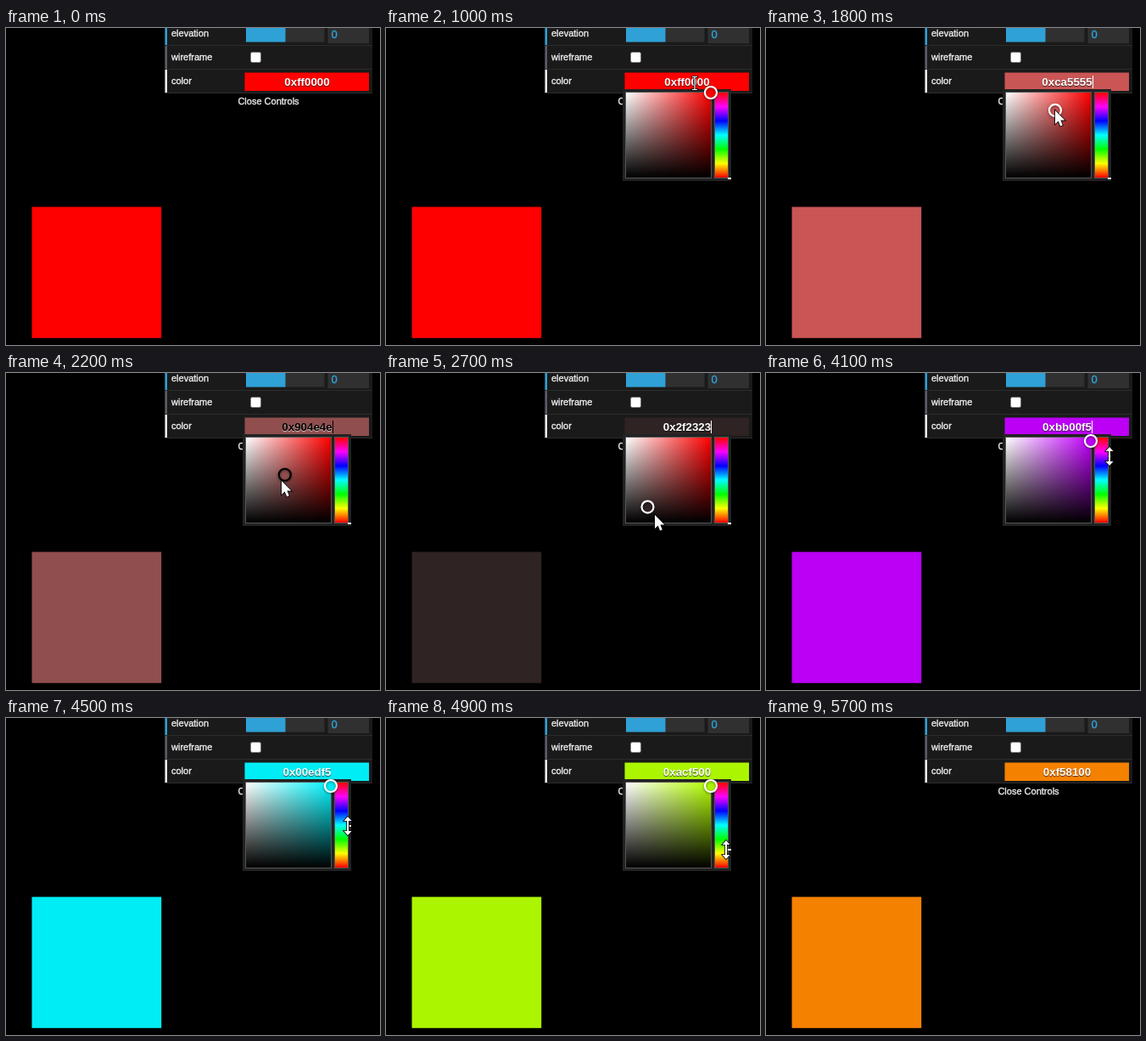
These frames come from a looping animation (441 by 373 pixels, 6.1 s). An HTML page with a canvas:

```html
<!DOCTYPE html>
<html lang="en">
<head>
<meta charset="utf-8">
<title>Color controls</title>
<style>
  html, body { margin: 0; width: 100%; height: 100%; overflow: hidden; background: #000; }
  canvas { display: block; }
</style>
</head>
<body>
<canvas id="stage" width="441" height="373"></canvas>
<script>
const ctx = document.getElementById('stage').getContext('2d');
const LOOP = 6100, STEP = 100;
const FONT = '"Liberation Sans", Arial, sans-serif';
const BLUE = '#2fa1d6';
const FIELD = { x: 283, y: 76, size: 100 };
const BAR_X = 388, BAR_W = 15;

// Phases of the interaction, in ms.
const ENTER = 400, OPEN = 500, FOCUS = 1200, DRAG = 1500, HUE = 3800, LEAVE = 5300, CLOSE = 5500, GONE = 5700;

const clamp = (v, lo, hi) => Math.max(lo, Math.min(hi, v));
const mix = (a, b, p) => a.map((v, i) => v + (b[i] - v) * p);
const glide = (from, to, start, end, t) => mix(from, to, clamp((t - start) / (end - start), 0, 1));

// Stops of the drag through the field: [time, saturation, value].
const dragStops = [
  [DRAG, 1, 1], [1800, .579, .792], [1900, .58, .79], [2700, .255, .184],
  [2800, .34, .09], [3400, .855, .702], [3700, 1, .96]
];

function saturationValue(t) {
  const next = dragStops.findIndex(stop => stop[0] > t);
  if (next === 0) return [1, 1];
  if (next < 0) return dragStops.at(-1).slice(1);
  const [start, ...from] = dragStops[next - 1];
  const [end, ...to] = dragStops[next];
  return glide(from, to, start, end, t);
}

const hueAt = t => t < HUE ? 0 : clamp(285.8 - (t - 4100) * .26, 31.6, 360);
const hueY = hue => FIELD.y + FIELD.size * (1 - hue / 360);

function knobAt(t) {
  const [s, v] = saturationValue(t);
  return [FIELD.x + FIELD.size * s, FIELD.y + FIELD.size * (1 - v)];
}

function pointerAt(t) {
  const rest = [364, 65];
  if (t < DRAG) return glide([426, 72], rest, ENTER, 1000, t);
  if (t < DRAG + STEP) return mix(rest, knobAt(1800), .4);
  // The knob trails the pointer by one step.
  if (t < HUE) return knobAt(t + STEP);
  const onBar = [405 - (t - 4100) / 200, hueY(hueAt(t)) + 1];
  return glide(onBar, [411, 365], LEAVE, LEAVE + 3 * STEP, t);
}

function hsvToRgb(h, s, v) {
  return [5, 3, 1].map(n => {
    const k = (n + h / 60) % 6;
    return Math.round(255 * v * (1 - s * clamp(Math.min(k, 4 - k), 0, 1)));
  });
}

const css = rgb => `rgb(${rgb.join(',')})`;
const hex = rgb => '0x' + rgb.map(c => c.toString(16).padStart(2, '0')).join('');

function rect(fill, x, y, w, h) {
  ctx.fillStyle = fill;
  ctx.fillRect(x, y, w, h);
}

function label(str, x, y, { color = '#eee', size = 11, align = 'left' } = {}) {
  ctx.font = `${size}px ${FONT}`;
  ctx.textAlign = align;
  ctx.fillStyle = ctx.strokeStyle = color;
  ctx.lineWidth = .35;
  ctx.fillText(str, x, y);
  ctx.strokeText(str, x, y);
}

function gradient(x0, y0, x1, y1, colors) {
  const g = ctx.createLinearGradient(x0, y0, x1, y1);
  colors.forEach((c, i) => g.addColorStop(i / (colors.length - 1), c));
  return g;
}

function drawPanel() {
  rect('#1a1a1a', 187, 0, 245, 76);
  const rows = [['elevation', BLUE], ['wireframe', '#5f5a68'], ['color', '#eee']];
  rows.forEach(([name, color], i) => {
    const bottom = 20 + i * 28;
    rect('#2c2c2c', 187, bottom, 245, 1);
    rect(color, 187.5, bottom - 27, 2.5, 27);
    label(name, 195, bottom - 10);
  });
  label('Close Controls', 309.5, 90, { align: 'center' });

  rect('#303030', 283, 0, 92.5, 16.5);
  rect(BLUE, 283, 0, 46.5, 16.5);
  rect('#303030', 379.5, 0, 48.5, 18);
  label('0', 383.5, 11.5, { color: BLUE, size: 13 });

  ctx.beginPath();
  ctx.roundRect(288.5, 28.5, 12, 12, 2);
  ctx.fillStyle = '#fff';
  ctx.fill();
  ctx.strokeStyle = '#767676';
  ctx.lineWidth = 1;
  ctx.stroke();
}

function drawInput(rgb, light, caret) {
  rect(css(rgb), 281.5, 52.5, 146.5, 21.5);
  const str = hex(rgb), ink = light ? '#fff' : '#000';
  ctx.save();
  ctx.font = `bold 13.333px ${FONT}`;
  ctx.textAlign = 'center';
  ctx.shadowColor = light ? 'rgba(0,0,0,.7)' : 'rgba(255,255,255,.7)';
  ctx.shadowOffsetY = 1;
  ctx.shadowBlur = 1;
  ctx.fillStyle = ink;
  ctx.fillText(str, 355, 68);
  const end = 355 + ctx.measureText(str).width / 2;
  ctx.restore();
  if (caret) rect(ink, Math.round(end), 56, 1, 15);
}

function drawKnob(rgb, x, y, light) {
  ctx.save();
  ctx.beginPath();
  ctx.arc(x, y, 7, 0, Math.PI * 2);
  ctx.fillStyle = css(rgb);
  ctx.fill();
  ctx.shadowColor = 'rgba(0,0,0,.5)';
  ctx.shadowBlur = 3;
  ctx.shadowOffsetY = 1;
  ctx.lineWidth = 2.2;
  ctx.strokeStyle = light ? '#fff' : '#000';
  ctx.stroke();
  ctx.restore();
}

function drawPicker(hue) {
  const { x, y, size } = FIELD;
  rect('#222', 279, 72, 128, 108);
  rect('#555', x - 1, y - 1, size + 2, size + 2);
  rect(gradient(x, 0, x + size, 0, ['#fff', css(hsvToRgb(hue, 1, 1))]), x, y, size, size);
  rect(gradient(0, y, 0, y + size, ['rgba(0,0,0,0)', '#000']), x, y, size, size);

  rect('#555', BAR_X - 1, y - 1, BAR_W + 2, size + 2);
  const wheel = ['#f00', '#f0f', '#00f', '#0ff', '#0f0', '#ff0', '#f00'];
  rect(gradient(0, y, 0, y + size, wheel), BAR_X, y, BAR_W, size);
  rect('#fff', BAR_X + BAR_W, Math.round(hueY(hue)), 4, 2);
}

const shapes = {
  arrow: new Path2D('M0 0V16L3.7 12.6L6.2 18.4L8.8 17.3L6.4 11.6H11.4Z'),
  resize: new Path2D('M0-11L4.5-6H1V6H4.5L0 11L-4.5 6H-1V-6H-4.5Z'),
  beam: new Path2D('M-3-8H3V-7H.6V7H3V8H-3V7H-.6V-7H-3Z')
};

function drawPointer(t) {
  const [x, y] = pointerAt(t);
  const shape = t < DRAG ? shapes.beam : t >= HUE && t <= LEAVE ? shapes.resize : shapes.arrow;
  ctx.save();
  ctx.translate(Math.round(x), Math.round(y));
  ctx.lineWidth = 1.6;
  ctx.strokeStyle = '#000';
  ctx.stroke(shape);
  ctx.fillStyle = '#fff';
  ctx.fill(shape);
  ctx.restore();
}

function draw(t) {
  const [s, v] = saturationValue(t);
  const hue = hueAt(t);
  const rgb = hsvToRgb(hue, s, v);
  const light = v < .5 || s > .5;

  rect('#000', 0, 0, 441, 373);
  rect(css(rgb), 30.5, 210.5, 152.7, 154.3);
  drawPanel();
  drawInput(rgb, light, t >= FOCUS && t < 4300);
  if (t >= OPEN && t < CLOSE) {
    drawPicker(hue);
    drawKnob(rgb, ...knobAt(t), light);
  }
  if (t >= ENTER && t < GONE) drawPointer(t);
}

function tick() {
  draw(Math.floor(performance.now() % LOOP / STEP) * STEP);
  requestAnimationFrame(tick);
}
tick();
</script>
</body>
</html>
```
